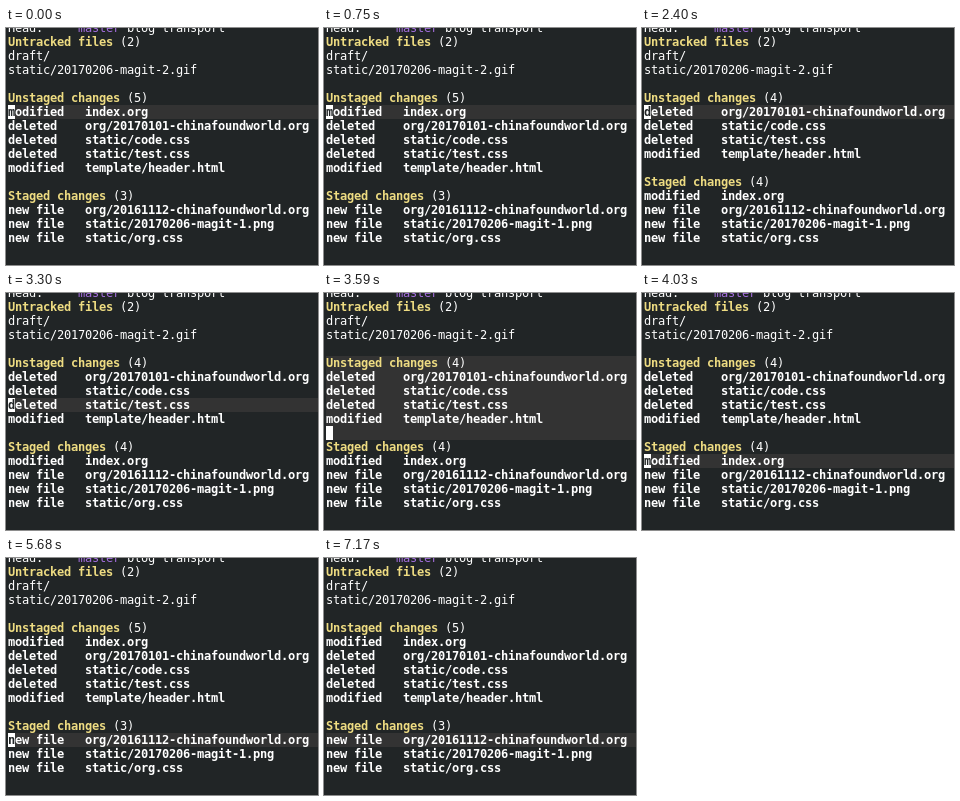
Write an HTML page that moves like this. It is 312 by 237 pixels and loops after 7.32 s.

```html
<!DOCTYPE html>
<html lang="en">
<head>
<meta charset="utf-8">
<title>Git status buffer</title>
<style>
:root { --bg: #212526; --fg: #fff; --loop: 7320ms; }
html, body {
  margin: 0; width: 100%; height: 100%;
  overflow: hidden; background: var(--bg);
}
#stage {
  position: absolute; inset: 0; overflow: hidden; color: var(--fg);
  font: 12px/14px "DejaVu Sans Mono", monospace;
  letter-spacing: calc(7px - 1ch);
}
pre { position: absolute; left: 2px; margin: 0; font: inherit; }
#top { top: -7px; }
.view { top: 63px; }
.view, #bar, #cursor, #glyphs { animation: var(--loop) step-end infinite; }
h2 { display: inline; margin: 0; font: inherit; font-weight: bold; color: #eedc82; }
b { font-weight: bold; }
.branch { color: #a56fe0; }

#bar { position: absolute; left: 2px; right: 0; background: #333; animation-name: bar; }
#cursor {
  position: absolute; left: 2px; width: 7px; height: 14px; overflow: hidden;
  background: var(--fg); color: var(--bg); font-weight: bold;
  animation-name: move, blink;
}
#glyphs { left: 0; animation-name: glyph; }
#before { animation-name: before; }
#after { animation-name: after; }

/* file moved to the staged list, then back */
@keyframes before {
  0%, 77.595% { visibility: visible; }
  32.786% { visibility: hidden; }
  100% { visibility: visible; }
}
@keyframes after {
  0%, 77.595% { visibility: hidden; }
  32.786% { visibility: visible; }
  100% { visibility: hidden; }
}
/* current line, or the whole section on its heading or gap */
@keyframes bar {
  0% { top: 77px; height: 14px; }
  40.983% { top: 91px; height: 14px; }
  45.081% { top: 105px; height: 14px; }
  47.131% { top: 119px; height: 14px; }
  49.043% { top: 63px; height: 84px; }
  51.092% { top: 147px; height: 84px; }
  55.054% { top: 161px; height: 14px; }
  77.595%, 100% { top: 175px; height: 14px; }
}
@keyframes move {
  0% { top: 77px; }
  40.983% { top: 91px; }
  45.081% { top: 105px; }
  47.131% { top: 119px; }
  49.043% { top: 133px; }
  51.092% { top: 147px; }
  55.054% { top: 161px; }
  77.595%, 100% { top: 175px; }
}
@keyframes blink {
  0%, 10.245%, 22.54%, 40.983%, 69.398%, 77.595%, 91.803% { opacity: 1; }
  2.049%, 16.393%, 38.934%, 63.251%, 83.743%, 97.95%, 100% { opacity: 0; }
}
/* strip of letters under the cursor: m d (blank) S n */
@keyframes glyph {
  0%, 47.131%, 55.054% { top: 0; }
  32.786% { top: -14px; }
  49.043% { top: -28px; }
  51.092% { top: -42px; }
  77.595%, 100% { top: -56px; }
}
</style>
</head>
<body>
<div id="stage">
<div id="bar"></div>
<pre id="top">Head:     <span class="branch">master</span> blog transport
<h2>Untracked files</h2> (2)
draft/
static/20170206-magit-2.gif</pre>
<pre class="view" id="before"><h2>Unstaged changes</h2> (5)
<b>modified   index.org
deleted    org/20170101-chinafoundworld.org
deleted    static/code.css
deleted    static/test.css
modified   template/header.html</b>

<h2>Staged changes</h2> (3)
<b>new file   org/20161112-chinafoundworld.org
new file   static/20170206-magit-1.png
new file   static/org.css</b></pre>
<pre class="view" id="after"><h2>Unstaged changes</h2> (4)
<b>deleted    org/20170101-chinafoundworld.org
deleted    static/code.css
deleted    static/test.css
modified   template/header.html</b>

<h2>Staged changes</h2> (4)
<b>modified   index.org
new file   org/20161112-chinafoundworld.org
new file   static/20170206-magit-1.png
new file   static/org.css</b></pre>
<div id="cursor"><pre id="glyphs">m
d

S
n</pre></div>
</div>
</body>
</html>
```
